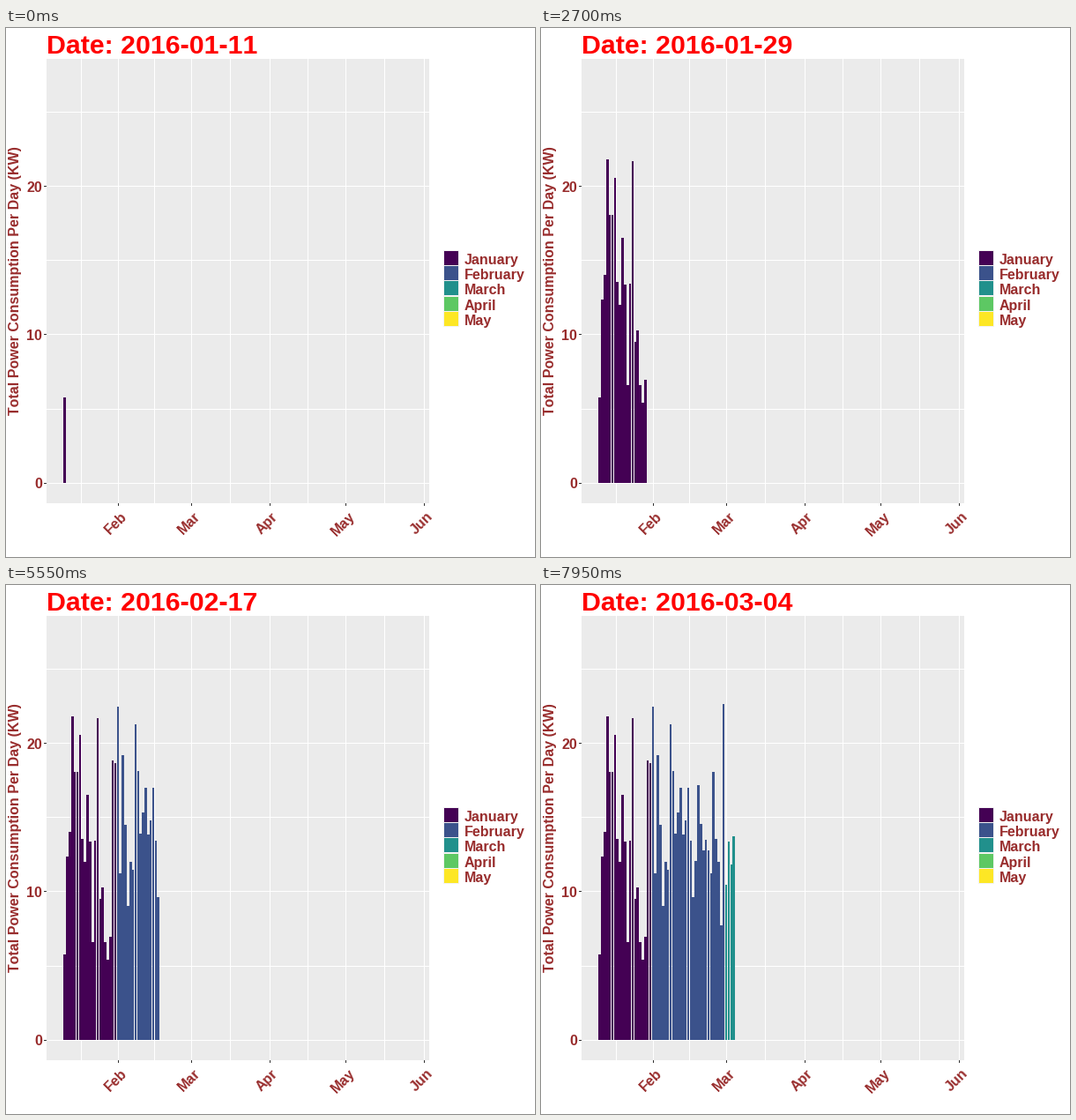
Animation of 600x600 px, one loop 8 s. Source, as a matplotlib script:

```python
import matplotlib.pyplot as plt
from matplotlib.animation import FuncAnimation
from matplotlib.patches import Rectangle

plt.rcParams.update({
    "font.family": "Liberation Sans",
    "font.weight": "bold",
    "text.kerning_factor": 6,  # switches pair kerning off
})

SIZE, DPI = 600, 100
STEP_MS, STEPS_PER_DAY, LOOP_MS = 50, 3, 8000

LEFT, TOP, RIGHT, BOTTOM = 46, 35, 480, 539
ZERO, PX_PER_KW = 516, 16.83
FIRST_BAR, PX_PER_DAY, BAR_WIDTH = 65.38, 2.868, 2.581

BROWN, TICK = "#982c2c", "#333333"
MONTHS = [("January", "#440154"), ("February", "#3B528B"), ("March", "#21908C"),
          ("April", "#5DC863"), ("May", "#FDE725")]
MONTH_DAYS = [31, 29, 31, 30, 31]
FIRST_DAY = 11

POWER = [
    5.77, 12.36, 14.02, 21.81, 18.06, 18.06, 20.56, 13.55, 12.0,
    16.52, 13.37, 6.6, 13.43, 21.69, 9.51, 10.28, 6.6, 5.41,
    6.95, 18.84, 18.66, 22.46, 11.23, 19.19, 14.5, 9.03, 12.0,
    11.47, 21.27, 18.12, 13.9, 15.33, 16.99, 13.84, 14.8, 16.99,
    13.43, 9.63, 12.06, 17.17, 14.56, 12.77, 13.49, 12.77, 11.23,
    18.06, 13.55, 12.0, 7.72, 22.64, 10.46, 13.37, 11.82, 13.73,
]

fig = plt.figure(figsize=(SIZE / DPI, SIZE / DPI), dpi=DPI, facecolor="white")
ax = fig.add_axes([0, 0, 1, 1])
ax.set_xlim(0, SIZE)
ax.set_ylim(SIZE, 0)
ax.axis("off")


def box(x0, y0, x1, y1, color, z=1):
    patch = Rectangle((x0, y0), x1 - x0, y1 - y0, facecolor=color,
                      linewidth=0, antialiased=False, zorder=z)
    return ax.add_patch(patch)


def label(x, y, text, px=16, color=BROWN, **kw):
    return ax.text(x, y, text, fontsize=px * 72 / DPI, color=color,
                   va="baseline", **kw)


def calendar(day):
    """Month index and day of month, counted from the first bar."""
    month, date = 0, FIRST_DAY + day
    while date > MONTH_DAYS[month]:
        date -= MONTH_DAYS[month]
        month += 1
    return month, date


def title_text(day):
    month, date = calendar(day)
    return f"Date: 2016-{month + 1:02d}-{date:02d}"


# Panel and grid
box(LEFT, TOP, RIGHT, BOTTOM, "#EBEBEB")
for y in (95, 179, 263, 347, 432, 516):
    box(LEFT, y, RIGHT, y + 1, "white", 2)
for x in (85, 127, 168, 210, 254, 299, 342, 385, 429, 474):
    box(x, TOP, x + 1, BOTTOM, "white", 2)

# Axes
for y, text in ((179, "20"), (347, "10"), (516, "0")):
    box(LEFT - 3, y, LEFT, y + 1, TICK)
    label(41, y + 6.5, text, ha="right")
for x, y, text in ((127, 565, "Feb"), (210, 565, "Mar"), (299, 565, "Apr"),
                   (385, 566, "May"), (474, 565, "Jun")):
    box(x, BOTTOM, x + 1, BOTTOM + 3, TICK)
    label(x + 0.5, y, text, ha="center", rotation=45, rotation_mode="anchor")
label(15, 287, "Total Power Consumption Per Day (KW)",
      ha="center", rotation=90, rotation_mode="anchor")

# Legend
box(496, 252, 514, 339, "#F2F2F2")
for i, (name, color) in enumerate(MONTHS):
    y = round(252.9 + 17.28 * i)
    box(497, y, 513, y + 16, color, 2)
    label(520, y + 15, name)

# Bars, with edges on whole pixels
bars = []
for day, power in enumerate(POWER):
    x = FIRST_BAR + PX_PER_DAY * day
    bars.append(box(round(x), round(ZERO - power * PX_PER_KW),
                    round(x + BAR_WIDTH), ZERO, MONTHS[calendar(day)[0]][1], 3))

title = label(46, 29, title_text(0), px=30.4, color="#FF0000")


def update(step):
    # Each bar shows up one step ahead of its date
    newest = (step + 1) // STEPS_PER_DAY
    for day, bar in enumerate(bars):
        bar.set_visible(day <= newest)
    title.set_text(title_text(step // STEPS_PER_DAY))
    return [title, *bars]


anim = FuncAnimation(fig, update, frames=LOOP_MS // STEP_MS, interval=STEP_MS,
                     repeat=True, repeat_delay=0, blit=False)
plt.show()
```
